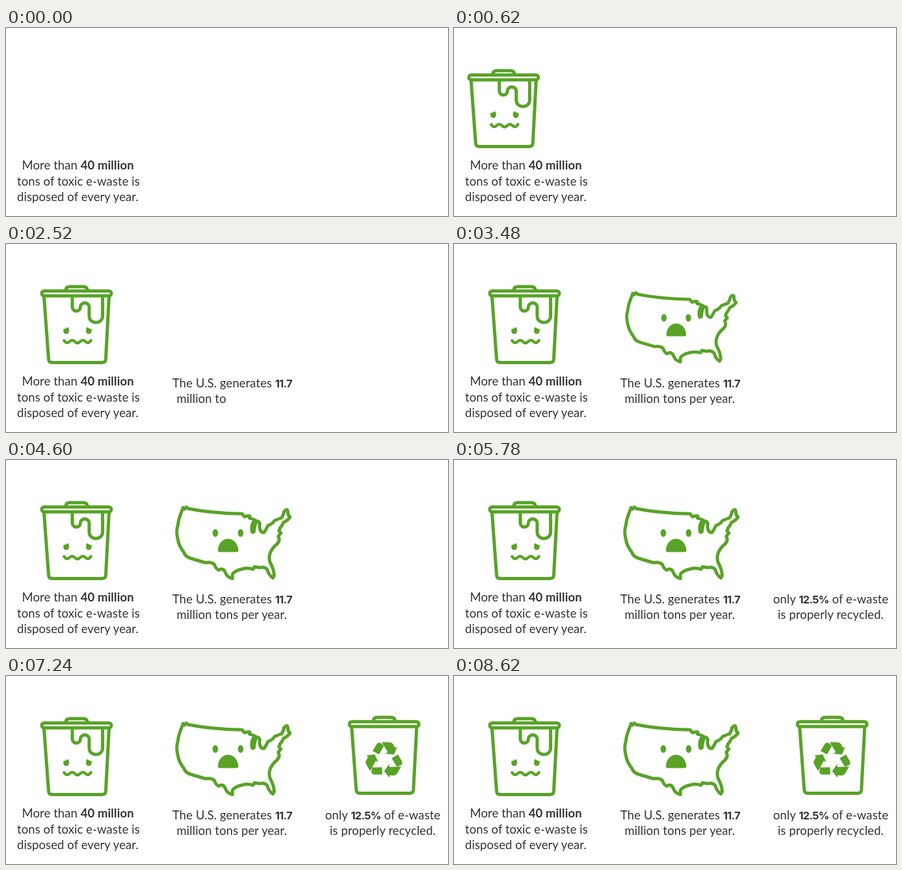
Recreate the animation shown at these times as an HTML page. Size 680 by 291 pixels, loop 8640 ms.

```html
<!DOCTYPE html>
<html lang="en">
<head>
<meta charset="utf-8">
<title>E-waste facts</title>
<style>
  html, body { margin: 0; width: 100%; height: 100%; overflow: hidden; background: #fff; }
  svg { display: block; width: 100vw; height: 100vh; }
  text { font: 18.5px Lato, "Open Sans", sans-serif; letter-spacing: .08px; fill: #333; white-space: pre; }
  .b { font-weight: 700; }
  .fig { font: 700 16.5px Inter, sans-serif; letter-spacing: -.7px; }
  .line { fill: none; stroke: #58a327; stroke-width: 5; stroke-linecap: round; stroke-linejoin: round; }
  .solid { fill: #58a327; }
</style>
</head>
<body>
<svg viewBox="0 0 680 291">
  <defs>
    <g id="can" class="line">
      <path d="M58.5 82L65.5 178Q66 183.5 71 183.5H148Q153 183.5 153.5 178L158.5 82"/>
      <path d="M92 71Q92.5 66 98 66H119Q124.5 66 125 71"/>
      <rect x="55" y="72.7" width="107" height="7.6" rx="3.8" fill="#fff"/>
    </g>
    <path id="eye" class="solid" d="M95 128.8C98.2 131 97.7 139.3 93 139.3C88.5 139.2 87.4 134.3 88.6 131.5Q92.3 131.2 95 128.8Z"/>
    <g id="arrow" class="solid">
      <path d="M564 116L570.5 105Q572.5 102.5 576 103.5L581.5 108L574 121.5Z"/>
      <path d="M578 102.5H590Q593.5 102.5 595.5 105.5L598.5 111L602 109.5L597 121.5L583.5 120.5L587.5 118Z"/>
    </g>
  </defs>

  <g id="toxic">
    <use href="#can"/>
    <path class="line" d="M102 82V97.5a6.2 6.2 0 0 0 12.4 0a6.8 6.2 0 0 1 13.6 0V112a10.3 9.6 0 0 0 20.6 0V82"/>
    <use href="#eye"/>
    <use href="#eye" transform="matrix(-1 0 0 1 220 0)"/>
    <path class="line" style="stroke-width:4.4" d="M89.3 149.3q4.2 6.2 8.4 1.7q4.1-4 8.2 0q4.1 4.6 8.2 0q4.1-4 8.2 0q4.2 4.5 8.4-1.7"/>
  </g>

  <g id="map">
    <path class="line" d="M272.5 73.5L274.5 76L277.5 72.8L280 75.2Q317 82.5 363 83.2L367 88
      Q370 85.8 375 86.8Q373 91 377 90.5L384 93.5Q377.5 97 378 108Q378.5 114 381.5 111
      Q383 96 387.5 95Q391.5 96 390 102C390 109 393 113 397 112Q400 108 403 101.5
      Q410 99 413.5 93.5L424 89.5Q427 85 428 79.5Q432 74.5 433.5 79Q433 85 437 88.5
      Q433 94 427 96.5Q425 101 421.5 105.5L420 110L423 113L418.8 118Q422.5 124 417 130
      Q408 137 405.5 147Q404 155 407.5 161Q412 169 412.5 179L410.5 182.5
      Q404 178 402 169.5Q398 164.5 390 166.5L382.5 165.2L380 169Q372 166.5 364 168.5
      Q351 171.5 348.3 177V183.5Q340 181.5 338 175Q334 165.5 327.5 170.5Q323 169 320.5 161.5
      Q315 157.5 307 159L285 152.5Q276 150 274 143.5Q266 133 264.5 123.5Q261 110 264.5 101Q265 92 270.5 79Z"/>
    <ellipse class="solid" cx="322" cy="113" rx="4.3" ry="6"/>
    <ellipse class="solid" cx="361" cy="113" rx="4.3" ry="6"/>
    <path class="solid" d="M326 139C327 128 334 122 341.7 122C350 122 356.5 129 357.5 139Q358 142.5 354.5 142.5H329Q325.5 142.5 326 139Z"/>
  </g>

  <g id="recycle">
    <use href="#can" x="473.3" y="-2"/>
    <use href="#arrow"/>
    <use href="#arrow" transform="rotate(120 582 130)"/>
    <use href="#arrow" transform="rotate(240 582 130)"/>
  </g>
  <g id="copy"></g>
</svg>
<script>
const LOOP = 8640, CHAR = 20;
const NS = 'http://www.w3.org/2000/svg';
const el = id => document.getElementById(id);
const toxic = el('toxic'), map = el('map'), recycle = el('recycle');

// Each line: x, baseline, runs of text; text between asterisks is bold.
const blocks = [
  { start: -9999, lines: [[24.5, 219, 'More than *40 million*'], [17, 243.6, 'tons of toxic e-waste is'], [17, 268, 'disposed of every year.']] },
  { start: 1860, lines: [[256, 221.6, 'The U.S. generates *11.7*'], [262.5, 246, 'million tons per year.']] },
  { start: 4780, lines: [[491, 221.6, 'only *12.5%* of e-waste'], [498, 246, 'is properly recycled.']] }
];

for (const block of blocks) {
  block.runs = [];
  for (const [x, y, str] of block.lines) {
    const text = document.createElementNS(NS, 'text');
    text.setAttribute('x', x);
    text.setAttribute('y', y);
    str.split('*').forEach((part, i) => {
      const node = document.createElementNS(NS, 'tspan');
      if (i % 2) node.setAttribute('class', part.includes('.') ? 'fig' : 'b');
      text.append(node);
      block.runs.push({ node, part });
    });
    el('copy').append(text);
  }
}

function type(block, t) {
  let left = Math.max(0, Math.floor((t - block.start) / CHAR));
  for (const { node, part } of block.runs) {
    const shown = part.slice(0, left);
    if (node.textContent !== shown) node.textContent = shown;
    left -= Math.min(left, part.length);
  }
}

// Remaining distance, from 1 to 0, of a damped spring; s in seconds.
function spring(s, w, damp) {
  if (s <= 0) return 1;
  const a = w * s;
  return Math.exp(-damp * a) * (Math.cos(a) + damp * Math.sin(a));
}

function bounceOut(p) {
  if (p <= 0) return 0;
  if (p >= 1) return 1;
  const n = p * 2.75;
  if (n < 1) return n * n;
  if (n < 2) return (n - 1.5) ** 2 + .75;
  if (n < 2.5) return (n - 2.25) ** 2 + .9375;
  return (n - 2.625) ** 2 + .984375;
}

function wobble(t) {
  const s = (Math.max(t, 3170) - 3330) / 1000;
  return 1 + .077 * Math.exp(-5.3 * s) * Math.cos(Math.PI * s / .16);
}

function draw(t) {
  blocks.forEach(block => type(block, t));

  const x = t < 1500 ? -166 * spring((t - 341) / 1000, 5.86, .833) : 0;
  toxic.setAttribute('transform', `translate(${x} 0)`);

  const y = t < 3860 ? -192 * spring((t - 2980) / 1000, 10.34, .63) : 0;
  const k = t < 3860 ? wobble(t) : 1;
  map.setAttribute('transform', `translate(350 ${128 + y}) scale(${k}) translate(-350 -128)`);

  const drop = -185 * (1 - bounceOut((t - 5835) / 1000));
  recycle.setAttribute('transform', `translate(0 ${drop})`);
}

const begin = performance.now();
function frame() {
  draw((performance.now() - begin) % LOOP);
  requestAnimationFrame(frame);
}
draw(0);
requestAnimationFrame(frame);
</script>
</body>
</html>
```
